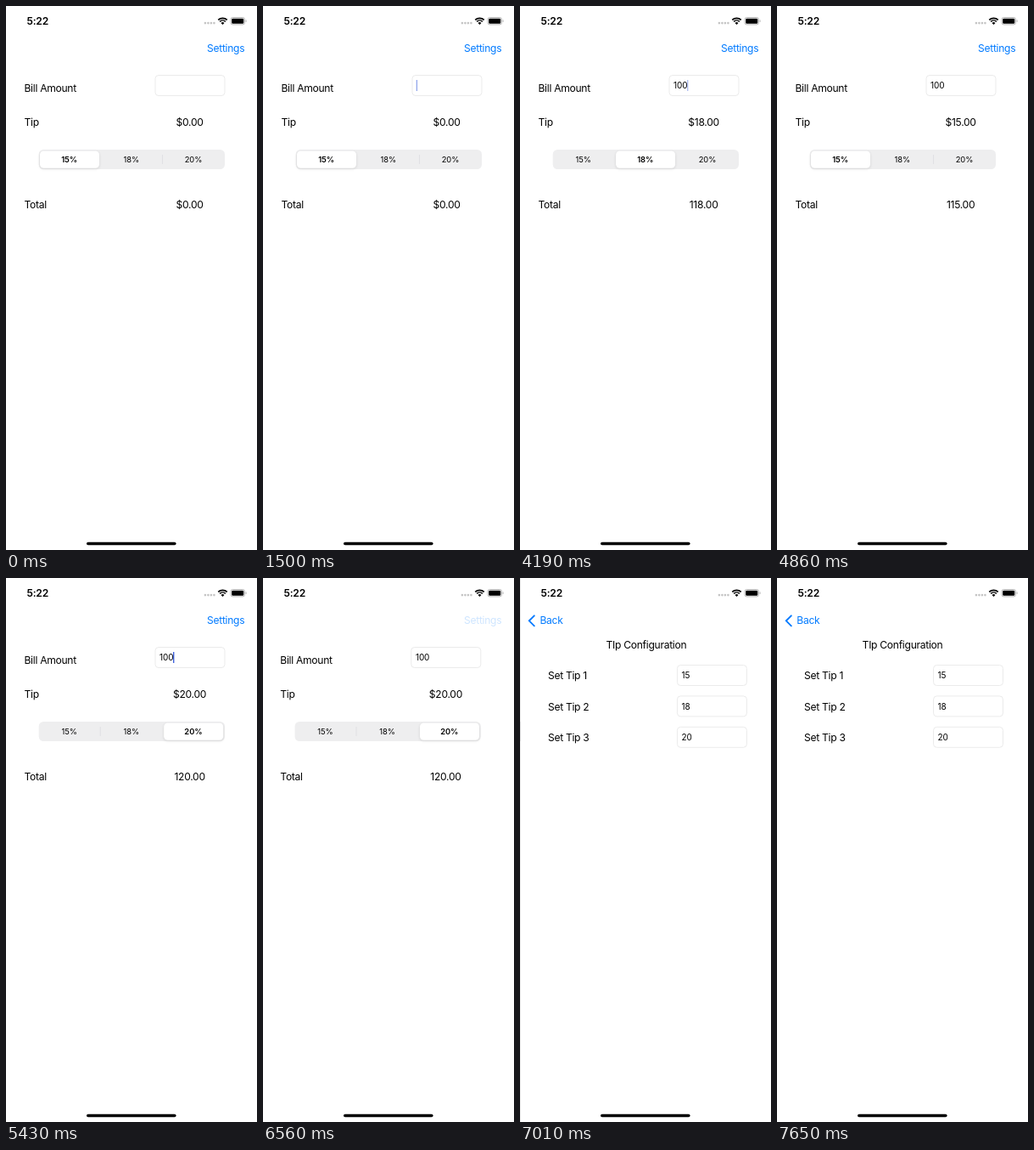
An HTML page with a canvas for the animation above (8 s loop, 296x640 px).

```html
<!DOCTYPE html>
<html lang="en">
<head>
<meta charset="utf-8">
<title>Tip calculator</title>
<style>
  html, body { margin: 0; width: 100%; height: 100%; overflow: hidden; background: #fff; }
  canvas { display: block; }
</style>
</head>
<body>
<canvas id="stage" width="296" height="640"></canvas>
<script>
const W = 296, H = 640, LOOP = 8000;
const BLUE = '#007aff', CARET = '#3f62dc';
const ctx = document.getElementById('stage').getContext('2d');

const ticks = [
  0, 500, 1150, 1380, 1500, 1950, 2160, 2800, 2920,
  3090, 3200, 3310, 3430, 3540, 3650, 3770, 3880,
  4190, 4290, 4400, 4510, 4620, 4860, 4970, 5090, 5200, 5310, 5430,
  5780, 5890, 6130, 6250, 6370, 6560, 6680, 6800, 6900, 7010, 7650
];
const taps = [
  { at: 3300, index: 1 },
  { at: 4240, index: 0 },
  { at: 4950, index: 2 }
];
const rates = [15, 18, 20];
const SLIDE = 380, PUSH = 6550;

const clamp = v => Math.min(1, Math.max(0, v));
const ease = u => (1 - Math.cos(Math.PI * clamp(u))) / 2;

function text(str, x, y, { size = 12.1, weight = 400, align = 'left', color = '#000', track = -0.29 } = {}) {
  ctx.font = `${weight} ${size}px Inter, sans-serif`;
  ctx.letterSpacing = track + 'px';
  ctx.textAlign = align;
  ctx.fillStyle = color;
  ctx.fillText(str, x, y + size * 0.365);
}

function box(x, y, w, h, r, fill, stroke) {
  ctx.beginPath();
  ctx.roundRect(x, y, w, h, r);
  if (fill) { ctx.fillStyle = fill; ctx.fill(); }
  if (stroke) { ctx.strokeStyle = stroke; ctx.lineWidth = 1; ctx.stroke(); }
}

function withAlpha(alpha, draw) {
  ctx.save();
  ctx.globalAlpha *= alpha;
  draw();
  ctx.restore();
}

function field(x, y, value) {
  box(x, y, 82, 24, 4, '#fff', '#ebebeb');
  text(value, x + 5.1, y + 12.2, { size: 10, track: -0.1 });
}

function caretAlpha(t) {
  if (t < 500 || t >= PUSH) return 0;
  const start = t < 1950 ? 430 : t < 2160 ? 1950 : 2160;
  const age = t - start - 620;
  if (age < 0) return 1;
  const p = age % 993;
  return p < 30 ? 1 - p / 30 : clamp((p - 320) / 240);
}

function segments(t) {
  let selected = 0, knob = 0;
  for (const { at, index } of taps) {
    if (t < at) break;
    knob = selected + (index - selected) * ease((t - at) / SLIDE);
    selected = index;
  }
  box(38.7, 169, 219.3, 23, 5.5, '#eeeeef');
  for (const i of [0, 1]) {
    if (selected !== i && selected !== i + 1) {
      ctx.fillStyle = '#dddde0';
      ctx.fillRect(110.8 + 73.2 * i, 175, 0.8, 11);
    }
  }
  ctx.save();
  ctx.shadowColor = 'rgba(0,0,0,.12)';
  ctx.shadowBlur = 3.5;
  ctx.shadowOffsetY = 1;
  box(40 + 73.1 * knob, 170.5, 70, 20.3, 4.5, '#fff');
  ctx.restore();
  rates.forEach((rate, i) => text(rate + '%', 74.6 + 73.2 * i, 181, {
    size: 9.4, weight: i === selected ? 600 : 400, align: 'center', track: -0.06
  }));
}

function billPage(t) {
  const amount = t < 1950 ? '' : t < 2160 ? '1' : '100';
  const tap = taps.filter(({ at }) => t >= at).pop();
  const rate = tap && rates[tap.index];
  const center = { align: 'center' };
  text('Bill Amount', 21.5, 97);
  text('Tip', 21.5, 137);
  text('Total', 21.5, 234);
  field(176, 81.5, amount);
  withAlpha(caretAlpha(t), () => {
    ctx.fillStyle = CARET;
    ctx.fillRect([180.7, 185, 0, 197][amount.length], 87, 1.4, 13);
  });
  text(rate ? `$${rate}.00` : '$0.00', 216.6, 137, center);
  text(rate ? `${100 + rate}.00` : '$0.00', 216.6, 234, center);
  segments(t);
}

function configPage() {
  ctx.fillStyle = '#fff';
  ctx.fillRect(0, 0, W, H);
  text('TIp Configuration', 148, 78.4, { align: 'center' });
  rates.forEach((rate, i) => {
    text('Set Tip ' + (i + 1), 32, 115 + 36.4 * i);
    field(184.5, 102.5 + 36.4 * i, String(rate));
  });
}

function navBar(t, remaining) {
  const pressed = t >= 6370 ? 0.2 : 1;
  withAlpha(pressed * remaining ** 2, () => text('Settings', 281.3, 50, { align: 'right', color: BLUE }));
  withAlpha((1 - remaining) ** 2, () => {
    ctx.strokeStyle = BLUE;
    ctx.lineWidth = 1.9;
    ctx.lineCap = 'round';
    ctx.beginPath();
    ctx.moveTo(16.8, 44.3);
    ctx.lineTo(10.8, 50.3);
    ctx.lineTo(16.8, 56.3);
    ctx.stroke();
    text('Back', 23.3 + 42 * remaining, 50, { color: BLUE });
  });
}

function statusBar() {
  text('5:22', 24.5, 17.8, { weight: 600, track: -0.2 });
  for (let i = 0; i < 4; i++) box(233.6 + 3.5 * i, 18.8, 2.6, 2.6, 1.3, '#c4c4c4');

  ctx.strokeStyle = ctx.fillStyle = '#000';
  ctx.lineCap = 'butt';
  ctx.lineWidth = 1.7;
  for (const radius of [7.4, 4.7]) {
    ctx.beginPath();
    ctx.arc(255.5, 21.7, radius, -Math.PI * 0.75, -Math.PI * 0.25);
    ctx.stroke();
  }
  ctx.beginPath();
  ctx.moveTo(255.5, 21.9);
  ctx.arc(255.5, 21.9, 2.8, -Math.PI * 0.75, -Math.PI * 0.25);
  ctx.fill();

  box(265, 13.5, 16.5, 8.4, 2.3, null, '#b8b8b8');
  box(266.2, 14.7, 14.1, 6, 1.3, '#000');
  box(282.6, 16.3, 1, 2.8, 0.5, '#b8b8b8');
  box(95, 630.7, 105.6, 3.6, 1.8, '#000');
}

function draw(t) {
  // Critically damped spring for the push transition.
  const u = Math.max(0, (t - PUSH) * 0.0173);
  const remaining = t >= 7650 ? 0 : (1 + u) * Math.exp(-u);
  const offset = W * remaining;

  ctx.fillStyle = '#fff';
  ctx.fillRect(0, 0, W, H);
  if (remaining > 0) {
    ctx.save();
    ctx.translate((offset - W) * 0.3, 0);
    billPage(t);
    ctx.restore();
  }
  if (remaining < 1) {
    ctx.fillStyle = `rgba(0,0,0,${0.09 * (1 - remaining)})`;
    ctx.fillRect(0, 0, offset, H);
    ctx.save();
    ctx.translate(offset, 0);
    configPage();
    ctx.restore();
  }
  navBar(t, remaining);
  statusBar();
}

function frame() {
  const now = performance.now() % LOOP;
  draw(ticks.findLast(tick => tick <= now));
  requestAnimationFrame(frame);
}
frame();
</script>
</body>
</html>
```
